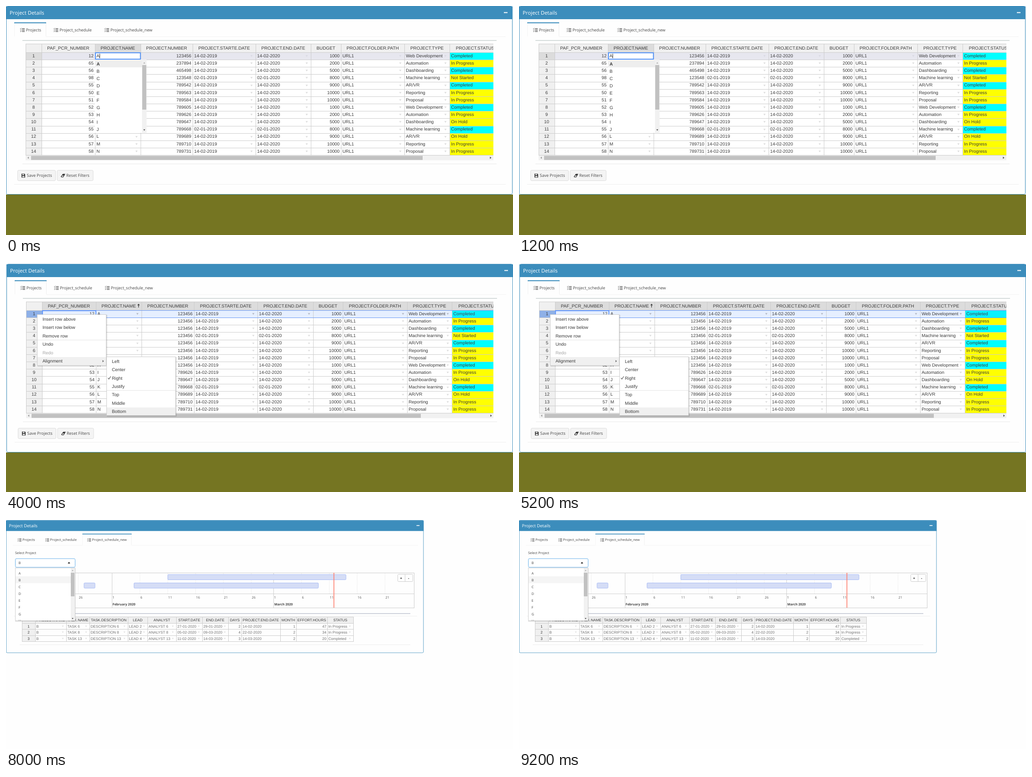
These frames come from a looping animation (1111 px wide and 504 px high, 10000 ms). An HTML page:

```html
<!DOCTYPE html>
<html lang="en">
<head>
<meta charset="utf-8">
<title>Project Details</title>
<style>
html, body { margin: 0; width: 100%; height: 100%; overflow: hidden; background: #fefefe; }
#stage { display: block; }
text { white-space: pre; text-rendering: geometricPrecision; }
.grid { font-family: "Liberation Sans", Arial, sans-serif; }
.ui { font-family: "Open Sans", "Noto Sans", sans-serif; }
</style>
</head>
<body>
<svg id="stage" width="1111" height="504" viewBox="0 0 1111 504"></svg>
<script>
const BLUE = '#3c8dbc', SELECT = '#4b89ff', LINE = '#cccccc', INK = '#3a3a3a';
const SMALL = 0.8245, STEP = 2000;

// Drawing helpers
const rect = (x, y, w, h, fill, more = '') =>
  `<rect x="${x}" y="${y}" width="${w}" height="${h}" fill="${fill}" ${more}/>`;
const frame = (x, y, w, h, stroke, fill = 'none', r = 0, width = 1) =>
  rect(x + .5, y + .5, w - 1, h - 1, fill, `stroke="${stroke}" stroke-width="${width}" rx="${r}"`);
const path = (d, fill, more = '') => `<path d="${d}" fill="${fill}" ${more}/>`;
const write = (font, x, y, s, size, fill, anchor, more = '') =>
  `<text class="${font}" x="${x}" y="${y}" font-size="${size}" fill="${fill}" text-anchor="${anchor}" ${more}>${s}</text>`;
const cellText = (x, y, s, anchor = 'start', size = 9.8, fill = INK, more) =>
  write('grid', x, y, s, size, fill, anchor, more);
const label = (x, y, s, size = 9, fill = '#444', more) =>
  write('ui', x, y, s, size, fill, 'start', more);
const group = (x, y, scale, body) =>
  `<g transform="translate(${x} ${y}) scale(${scale})">${body}</g>`;
const clip = (w, h, body) => `<svg width="${w}" height="${h}" overflow="hidden">${body}</svg>`;
const down = (x, y, fill, r = 2.5) => path(`M${x - r} ${y - r * .7}h${2 * r}l${-r} ${r * 1.5}z`, fill);
const up = (x, y, fill, r = 2.5) => path(`M${x - r} ${y + r * .7}h${2 * r}l${-r} ${-r * 1.5}z`, fill);
const side = (x, y, fill, dir) => path(`M${x - dir * 1.5} ${y - 2.5}v5l${dir * 3} -2.5z`, fill);
const each = (list, fn) => list.map(fn).join('');

// Data
const letters = [...'ABCDEFGHIJKLMN'];
const pafs = [12, 65, 56, 98, 55, 50, 51, 52, 53, 54, 55, 56, 57, 58];
const firstNumbers = [123456, 237894, 465498, 123548];
const numberAt = i => i < 4 ? firstNumbers[i] : 789542 + 21 * (i - 4);
const budgets = [1000, 2000, 5000, 8000, 9000, 10000, 10000];
const types = ['Web Development', 'Automation', 'Dashboarding', 'Machine learning', 'AR/VR', 'Reporting', 'Proposal'];
const states = { C: 'Completed', I: 'In Progress', N: 'Not Started', H: 'On Hold' };
const statusKeys = 'CICNCIICIHCHII';
const heads = ['', 'PAF_PCR_NUMBER', 'PROJECT.NAME', 'PROJECT.NUMBER', 'PROJECT.STARTE.DATE',
  'PROJECT.END.DATE', 'BUDGET', 'PROJECT.FOLDER.PATH', 'PROJECT.TYPE', 'PROJECT.STATUS'];
const rightCols = [1, 3, 6], arrowCols = [2, 4, 5, 7, 8];
const cols = [43, 78, 195, 295, 409, 547, 668, 734, 873, 972, 1084];
const wideCols = [43, 78, 196, 296, 411, 550, 672, 737, 878, 976, 1089];
const exactY = i => 102 + 16.15 * i;
const rowY = i => Math.round(exactY(i));

function rowData(i, copied) {
  const date = i === 3 || i === 10 ? '02-01' : '14-02';
  return [i + 1, pafs[i], letters[i], i < copied ? 123456 : numberAt(i), date + '-2019', date + '-2020',
    budgets[i % 7], 'URL1', types[i % 7], states[statusKeys[i]]];
}

const listIcon = (x, y) => each([0, 3.2, 6.4], d =>
  rect(x + 4, y + d, 6, 1.3, '#444') +
  path(`M${x} ${y + d + .3}l1 1l1.7 -2`, 'none', 'stroke="#444" stroke-width=".9"'));

function shell(height, active, width = 1110) {
  const tabs = [['Projects', 18, 70, 31], ['Project_schedule', 92, 108, 104.5], ['Project_schedule_new', 203, 131, 216]];
  const [, tx, tw] = tabs[active];
  return frame(0, 0, width, height, BLUE, '#fefefe', 3) +
    rect(0, 1, width, 28, BLUE) +
    label(8, 18.5, 'Project Details', 11.35, '#fff') +
    rect(1091, 13.5, 8, 2, '#fff') +
    rect(18, 67, 1077, 1, '#f2f2f2') +
    rect(tx, 37, tw, 31, '#fefefe') + rect(tx, 37, 1, 30, '#f2f2f2') + rect(tx + tw - 1, 37, 1, 30, '#eeeeee') +
    rect(tx, 36, tw, 2, BLUE) +
    each(tabs, ([s, , , x]) => listIcon(x, 49.2) + label(x + 12.7, 56, s));
}

function button(x, w, s, icon) {
  return frame(x, 361, w, 24, '#dddddd', '#f4f4f4', 2.5) + icon + label(x + 9.5 + 11, 376, s);
}

function buttons() {
  const save = path('M34 369h6.5l1.5 1.5v7h-8z', '#333') + rect(35.6, 369.8, 4, 2.4, '#f4f4f4') + rect(35.6, 374, 4.8, 2.6, '#f4f4f4');
  const erase = path('M120 375.5l4.5 -6h5.5l-4.5 7.5h-4.3z', '#333') + path('M121.6 375.3l1.7 -2.2h3l-1.6 2.6h-2.8z', '#f4f4f4');
  return button(25, 84, 'Save Projects', save) + button(111.5, 80, 'Reset Filters', erase);
}

function projects(o) {
  const c = o.cols || cols, right = o.right || 1068, hi = o.hi || 0;
  const width = k => c[k + 1] - c[k];
  let g = each(heads, (s, k) =>
    rect(c[k], 83, width(k), 19, o.head(k)) +
    cellText((c[k] + c[k + 1]) / 2, 95.8, s, 'middle'));
  for (let i = 0; i < 14; i++) {
    const y = rowY(i), h = rowY(i + 1) - y;
    g += each(rowData(i, o.copied || 0), (s, k) => {
      let fill = i < hi ? o.hiFill : '#ffffff';
      if (k === 0) fill = i < hi ? o.rowHead : '#f0f0f0';
      if (k === 9) fill = statusKeys[i] === 'C' ? '#00ffff' : '#ffff00';
      if (o.selCol === k && i < hi) fill = '#e4eefd';
      const mid = k === 0, end = rightCols.includes(k);
      const x = mid ? (c[0] + c[1]) / 2 : end ? c[k + 1] - 3 : c[k] + 3.3;
      return rect(c[k], y, width(k), h, fill) +
        (arrowCols.includes(k) ? down(c[k + 1] - 9, y + 8, o.arrow(i, k)) : '') +
        cellText(x, exactY(i) + 10.8, s, mid ? 'middle' : end ? 'end' : 'start');
    });
  }
  for (let i = 0; i <= 14; i++) g += rect(43, rowY(i), 1041, 1, LINE);
  g += rect(43, 83, 1041, 1, LINE);
  g += each(c.slice(0, 10), x => rect(x, 83, 1, 245, LINE));
  return rect(36, 75, 1039, 1.6, '#ccd4d3') + clip(right, 329, g) +
    rect(43, 329, right - 43, 10.5, '#f1f1f1') + rect(55, 329.8, o.thumb || 858, 9, '#c1c1c1') +
    side(48.5, 334, '#999', -1) + side(1062, 334, '#444', 1) +
    rect(36, 347, 1039, 1, '#e8e8e8') + rect(18, 392, 1077, 1, '#eeeeee') + buttons();
}

const selection = (x, y, w, h, rowH) =>
  frame(x, y, w, h, SELECT) + rect(x + 1, y + 1, w - 2, rowH - 2, 'none', `stroke="${SELECT}" stroke-width="2"`) +
  rect(x + w - 3, y + h - 3, 5, 5, SELECT, 'stroke="#fff" stroke-width=".5"');
const olive = y => rect(0, y, 1111, 504 - y, '#757522');
const paleArrow = hi => i => i < hi ? '#d9d9e2' : '#dddddd';

function editing() {
  const list = rect(195, 118, 113, 161, '#ffffff') + rect(195, 119, 103, 16, '#eeeeee') +
    each(letters.slice(0, 10), (s, i) =>
      cellText(198.5, 131 + 16.05 * i, s, 'start', 9.8, INK, i ? '' : 'font-weight="bold"')) +
    rect(298, 118, 10, 161, '#f1f1f1') + rect(298.5, 130, 9, 98, '#c1c1c1') +
    up(303, 125, '#aaa', 2) + down(303, 273, '#444', 2);
  const editor = rect(196, 103, 98.5, 14, '#fff', 'stroke="#5292f7" stroke-width="2"') +
    cellText(198.3, 113, 'A') + rect(205, 105, 1, 10, '#222');
  return olive(415) + shell(415, 0) + projects({
    hi: 1, hiFill: '#e7e7ef', rowHead: '#dcdcdc',
    head: k => k === 2 ? '#dcdcdc' : '#f0f0f0', arrow: paleArrow(1)
  }) + list + editor;
}

function filled() {
  return olive(415) + group(1, 0, 1, shell(415, 0) + projects({
    hi: 8, hiFill: '#e7e7ef', rowHead: '#dcdcdc', selCol: 3, copied: 8,
    head: k => k === 3 ? '#dcdcdc' : '#f0f0f0', arrow: paleArrow(8)
  }) + selection(295, 102, 115, 130, 17));
}

function menu() {
  const box = (x, y, w, h) => rect(x + 1, y + 1, w + 1, h + 1, '#000', 'opacity=".12"') + frame(x, y, w, h, LINE, '#ffffff');
  const items = ['Insert row above', 'Insert row below', 'Remove row', 'Undo', 'Redo', 'Alignment'];
  const aligns = ['Left', 'Center', 'Right', 'Justify', 'Top', 'Middle', 'Bottom'];
  const main = box(68, 113, 152, 113) + rect(69, 207, 150, 18, '#f0f0f0') + rect(69, 169, 150, 1, '#e4e4e4') +
    each(items, (s, i) => cellText(80, 127 + 18.45 * i, s, 'start', 9.85, i === 4 ? '#a5a5a5' : INK)) +
    side(213, 216, '#666', 1);
  const sub = box(220, 206, 152, 130) + rect(221, 318, 150, 17, '#f0f0f0') + rect(221, 280, 150, 1, '#e4e4e4') +
    each(aligns, (s, i) => cellText(232, 219.7 + 18.4 * i, s, 'start', 9.85)) +
    path('M223.5 253l2 2.5l4 -6', 'none', 'stroke="#444" stroke-width="1.1"');
  return olive(417) + group(1, 2, 1, shell(415, 0) + projects({
    cols: wideCols, right: 1067, thumb: 853, hi: 1, hiFill: '#e6efff', rowHead: '#8eb0e7', copied: 8,
    head: k => k ? '#dcdcdc' : '#f0f0f0', arrow: i => i ? '#dddddd' : '#b4b9c4'
  }) + path('M289.5 96v-7m-2 2.2l2 -2.4l2 2.4', 'none', 'stroke="#333" stroke-width="1.2"') +
    rect(977, 102, 90, 16, SELECT, 'opacity=".12"') +
    rect(78, 102, 989, 1, SELECT, 'opacity=".8"') + rect(78, 118, 989, 1, SELECT, 'opacity=".8"') +
    rect(79, 103, 117, 15, 'none', `stroke="${SELECT}" stroke-width="1.6"`)) + main + sub;
}

function column() {
  // The panel runs past its clipped right edge
  return group(0, -.6, SMALL, clip(1110, 414, shell(414, 0, 1120)) + projects({
    hi: 14, hiFill: '#e7e7ef', rowHead: '#e2e2e2', selCol: 5,
    head: k => k === 5 ? '#8eb0e7' : '#f0f0f0', arrow: (i, k) => k === 5 ? '#8f959f' : '#dedee6'
  }) + rect(607.6, 101, 121.4, 227, '#000', 'opacity=".19"') + selection(547, 101.5, 122, 226.5, 17));
}

function timeline() {
  const bar = (x, y, w) => frame(x, y, w, 12.5, '#a9bcf5', '#d5ddf6', 1.5);
  const ticks = [[158, 26], [232, 1], [293, 6], [354, 11], [415, 16], [476, 21], [537, 26],
    [586, 1], [647, 6], [708, 11], [769, 16], [830, 21]];
  const month = (x, s) => label(x, 188, s, 7.1, '#444', 'font-weight="bold"');
  return frame(20, 116, 875, 78, '#cccccc', '#fefefe') + rect(20, 162, 874, 1, '#cfcfcf') +
    each(ticks, ([x, s]) => (s === 1 ? rect(x, 116, 1, 77, '#cfcfcf') :
      path(`M${x + .5} 117V162`, 'none', 'stroke="#e4e4e4" stroke-dasharray="1 1"')) +
      label(x + 1.5, 173, s, 7.3, '#555')) +
    month(233.5, 'February 2020') + month(588, 'March 2020') +
    bar(354, 119.5, 391.5) + bar(280, 138, 405) + bar(170.5, 138, 25) +
    rect(717.7, 116, 1.7, 77, '#ff7f6e') +
    frame(858, 119, 34, 17, LINE, '#fff', 2) + rect(874, 119, 1, 17, LINE) +
    label(863.5, 130.5, '+', 8, '#222', 'font-weight="bold"') + label(881, 130.5, '-', 8, '#222', 'font-weight="bold"');
}

function tasks() {
  const c = [35, 64, 132, 183, 267, 310, 373, 430, 487, 516, 601, 636, 704, 761];
  const names = ['', 'PROJECT.NAME', 'TASK.NAME', 'TASK.DESCRIPTION', 'LEAD', 'ANALYST', 'START.DATE', 'END.DATE',
    'DAYS', 'PROJECT.END.DATE', 'MONTH', 'EFFORT.HOURS', 'STATUS'];
  const task = (i, n, lead, ...rest) => [i, 'B', 'TASK ' + n, 'DESCRIPTION ' + n, 'LEAD ' + lead, 'ANALYST ' + n, ...rest];
  const rows = [
    task(1, 6, 2, '27-01-2020', '29-01-2020', 2, '14-02-2020', 1, 47, 'In Progress'),
    task(2, 8, 2, '05-02-2020', '09-03-2020', 4, '22-02-2020', 2, 34, 'In Progress'),
    task(3, 13, 4, '11-02-2020', '14-03-2020', 3, '14-03-2020', 2, 20, 'Completed')];
  const ys = [213, 227, 240, 254, 267], nums = [8, 10, 11];
  return rect(35, 213, 726, 14, '#f0f0f0') + rect(35, 227, 29, 40, '#f0f0f0') +
    each(names, (s, k) => cellText((c[k] + c[k + 1]) / 2, 223, s, 'middle', 8.1)) +
    each(rows, (row, i) => each(row, (s, k) => {
      const y = ys[i + 1] + 10.2;
      if (!k) return cellText(49.5, y, s, 'middle', 8.1);
      const end = nums.includes(k);
      return (end || k === 9 ? '' : down(c[k + 1] - 7.5, y - 3.2, '#dddddd', 2)) +
        cellText(end ? c[k + 1] - 2 : c[k] + 2.5, y, s, end ? 'end' : 'start', 8.1, '#707070');
    })) +
    each(ys, y => rect(35, y, 727, 1, LINE)) + each(c, x => rect(x, 213, 1, 55, LINE));
}

function schedule() {
  const list = rect(20, 107, 132.5, 117, '#000', 'opacity=".1"') + frame(20, 105, 132, 117, '#d0d0d0', '#ffffff') +
    rect(21, 124, 121, 15, '#f5f5f5') +
    clip(152, 221.5, each(letters.slice(0, 8), (s, i) => label(27.5, 119.7 + 15.05 * i, s, 7.4))) +
    rect(142, 106, 9, 115, '#f1f1f1') + rect(142, 116, 8, 52, '#c1c1c1') +
    up(146, 111, '#aaa', 1.8) + down(146, 217, '#444', 1.8);
  return group(0, .3, SMALL, shell(354.5, 2)) +
    label(20, 74.5, 'Select Project', 7.4) +
    timeline() + rect(30, 205, 856, 1.7, '#c6cad6') + rect(17, 211, 884, 1, '#f0f0f0') +
    tasks() + rect(30, 274, 856, 1, '#ececec') +
    frame(20, 84.5, 132, 20, '#66afe9', '#ffffff', 2.5) + label(27.5, 97.3, 'B', 7.4) + up(138, 94, '#222', 2.6) + list;
}

const scenes = [editing, filled, menu, column, schedule];
const stage = document.getElementById('stage');
stage.innerHTML = each(scenes, draw => `<g>${draw()}</g>`);
const layers = [...stage.children];
const start = performance.now();

function show() {
  const now = Math.max(0, performance.now() - start);
  const active = Math.floor(now / STEP) % layers.length;
  layers.forEach((layer, i) => { layer.style.display = i === active ? '' : 'none'; });
  requestAnimationFrame(show);
}
show();
</script>
</body>
</html>
```
